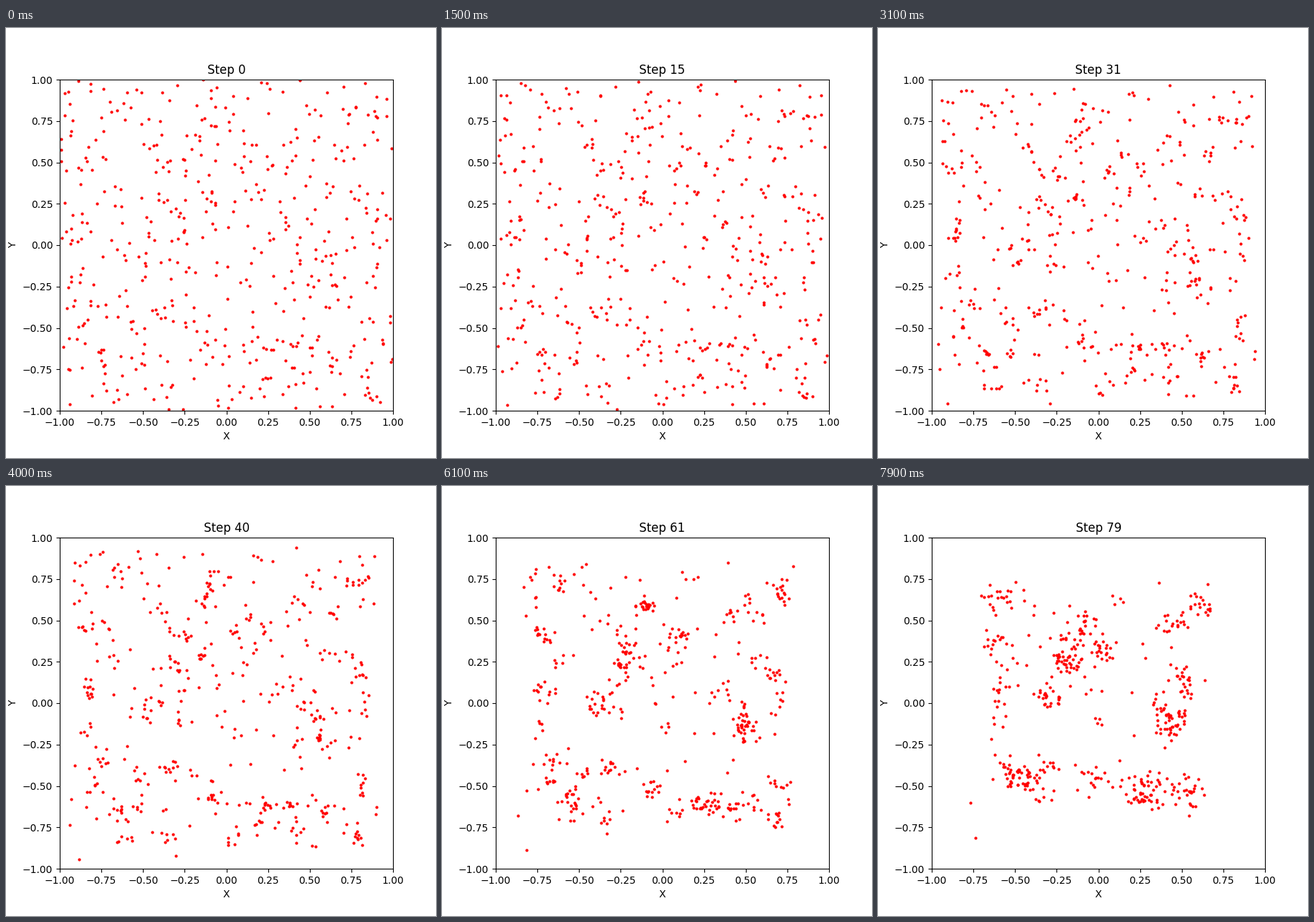
Animation of 600 by 600 pixels, one loop 8000 ms. Source, as a matplotlib script:

```python
import numpy as np
import matplotlib.pyplot as plt
from matplotlib.animation import FuncAnimation

COUNT = 500
STEPS = 80
PULL = 1.8e-7      # gravity of one particle, per step squared
SOFTENING = 0.05
SPEED = 0.001      # spread of the starting velocities, per step


def acceleration(pos):
    """Softened inverse-square attraction between all particles."""
    gap = pos[None, :, :] - pos[:, None, :]
    dist2 = (gap ** 2).sum(axis=2) + SOFTENING ** 2
    return PULL * (gap / dist2[:, :, None] ** 1.5).sum(axis=1)


def simulate():
    rng = np.random.default_rng(7)
    pos = rng.uniform(-1, 1, (COUNT, 2))
    vel = rng.normal(0, SPEED, (COUNT, 2))
    path = [pos]
    for _ in range(STEPS - 1):
        vel = vel + acceleration(pos)
        pos = pos + vel
        path.append(pos)
    return path


path = simulate()

fig, ax = plt.subplots(figsize=(6, 6), dpi=100)
ax.set_xlim(-1, 1)
ax.set_ylim(-1, 1)
ax.set_xlabel("X")
ax.set_ylabel("Y")
dots, = ax.plot([], [], "ro", markersize=2)
title = ax.set_title("Step 0")


def update(step):
    dots.set_data(path[step][:, 0], path[step][:, 1])
    title.set_text(f"Step {step}")
    return dots, title


anim = FuncAnimation(fig, update, frames=STEPS, interval=100,
                     repeat=True, repeat_delay=0, blit=False)
plt.show()
```
